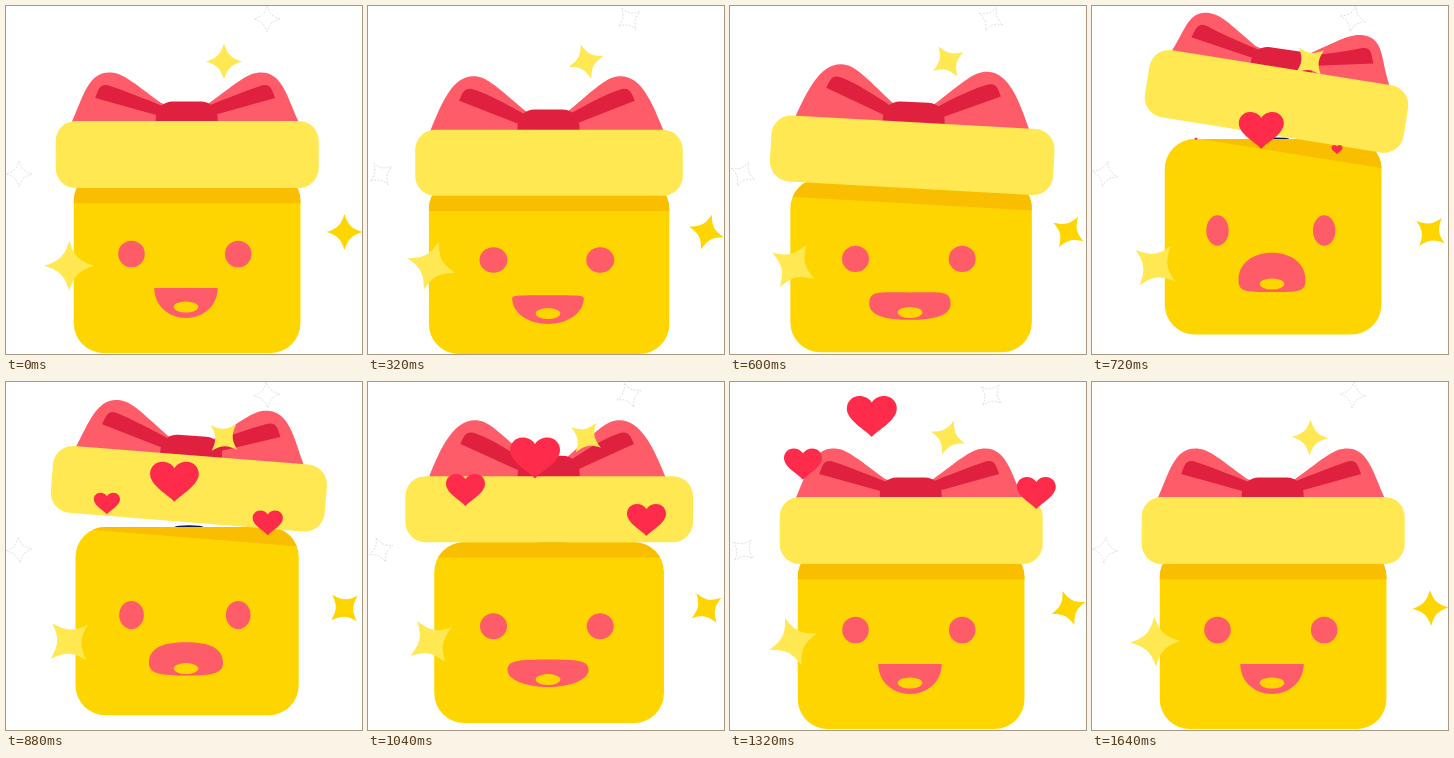
An HTML page that plays this animation: 356 px wide and 348 px high, repeating every 1.68 s.

```html
<!DOCTYPE html>
<html lang="en">
<head>
<meta charset="utf-8">
<title>Happy gift box</title>
<style>
html, body { margin: 0; width: 100%; height: 100%; overflow: hidden; background: #fff; }
svg { display: block; width: 356px; height: 348px; }
</style>
</head>
<body>
<svg id="stage" viewBox="0 0 356 348" xmlns="http://www.w3.org/2000/svg">
  <clipPath id="inside"><rect id="insideBox" rx="30"/></clipPath>
  <ellipse id="opening" cx="183" rx="14" ry="1.6" fill="#101a4a"/>
  <rect id="body" rx="30" fill="#ffd500"/>
  <g clip-path="url(#inside)"><rect id="shade" x="-220" width="440" fill="#f9be00"/></g>
  <g id="bow">
    <path id="loopL" fill="#ff5c69"/>
    <path id="loopR" fill="#ff5c69" transform="scale(-1 1)"/>
    <path id="foldL" fill="#e0203f"/>
    <path id="foldR" fill="#e0203f" transform="scale(-1 1)"/>
    <path id="knot" d="M-31 6V-2C-31-13-23-19.5-14-19.5H14C23-19.5 31-13 31-2V6Z" fill="#e0203f"/>
  </g>
  <rect id="lid" rx="20" fill="#ffe852"/>
  <ellipse id="eyeL" cx="125.5" fill="#ff5c69"/>
  <ellipse id="eyeR" cx="232.2" fill="#ff5c69"/>
  <path id="mouth" fill="#ff5c69"/>
  <ellipse id="tongue" cx="180" rx="12.3" ry="5.5" fill="#ffd500"/>
  <g id="hearts"></g>
  <g id="stars"></g>
</svg>
<script>
const LOOP = 1680, STEP = 40;
const $ = id => document.getElementById(id);

function set(el, attrs) {
  for (const k in attrs) el.setAttribute(k, attrs[k]);
}

function add(parent, attrs) {
  const el = document.createElementNS('http://www.w3.org/2000/svg', 'path');
  set(el, attrs);
  parent.appendChild(el);
  return el;
}

// Monotone cubic through (ts, vs), flat at both ends and at every extreme.
function curve(ts, vs, t) {
  const last = ts.length - 1;
  if (t <= ts[0]) return vs[0];
  if (t >= ts[last]) return vs[last];
  let i = 0;
  while (t >= ts[i + 1]) i++;
  const slope = j => (vs[j + 1] - vs[j]) / (ts[j + 1] - ts[j]);
  const tangent = j => {
    if (j === 0 || j === last) return 0;
    const a = slope(j - 1), b = slope(j);
    return a * b <= 0 ? 0 : 2 * a * b / (a + b);
  };
  const h = ts[i + 1] - ts[i], u = (t - ts[i]) / h, u2 = u * u, u3 = u2 * u;
  return vs[i] * (2 * u3 - 3 * u2 + 1) + vs[i + 1] * (3 * u2 - 2 * u3)
    + h * (tangent(i) * (u3 - 2 * u2 + u) + tangent(i + 1) * (u3 - u2));
}

// Each row: rest, crouch, squash, jump, landing.
const poses = {
  lidX: [181.2, 181, 181, 184.5, 181.2],
  lidY: [148.5, 156.8, 178.6, 95.3, 127.2],
  lidW: [263, 267.6, 295.4, 262, 287.6],
  lidH: [67, 66, 65, 68, 66],
  tilt: [0, 0, 0, 9.1, 0],
  bodyW: [226.7, 240.4, 255, 216.7, 229.7],
  top: [165, 173, 194, 133, 160.3],
  bottom: [347, 348, 356, 328.5, 341],
  bowH: [48.5, 53.5, 60, 44, 56],
  eyeY: [248, 254, 268.3, 224.5, 244.3],
  eyeW: [13.3, 14, 14.7, 11.2, 13.5],
  eyeH: [13.3, 12.7, 12, 15.3, 13],
  mouthW: [31.7, 35.8, 44.5, 33.5, 40.5],
  lipY: [282, 289.3, 308, 246.7, 277.5],
  sideY: [282, 292.5, 311, 274, 288],
  lipIn: [31, 33, 40, 19, 30],
  lipUp: [0, 3, 10, 17, 9.5],
  chinY: [312, 318, 329, 286, 305],
  chinIn: [17, 20, 25, 27, 22],
  chinUp: [18, 14, 10, 12, 10],
  tongueY: [301, 307.6, 322, 278, 297.6]
};
const poseTimes = [0, 120, 320, 520, 720, 1040, 1200];
const poseOrder = [0, 0, 1, 2, 3, 4, 0];

const hearts = [
  { t: [600, 720, 1040, 1320, 1600], x: [170, 169.3, 167, 141.8, 130], y: [145, 124.5, 76, 34.5, 2], w: [0, 45, 50, 50, 0] },
  { t: [700, 720, 1040, 1320, 1560], x: [105, 104, 97.5, 73, 58], y: [134, 133, 108, 82, 64], w: [0, 3, 39, 38, 0] },
  { t: [680, 720, 1040, 1320, 1580], x: [241, 245, 278.5, 306.3, 320], y: [145, 143.5, 138, 111, 92], w: [0, 11, 39, 39, 0] }
];
const heartPath = 'M0 20.5C-6 13.5-25 4-25-8C-25-15-19.5-20.5-12.5-20.5'
  + 'C-7-20.5-2.5-18 0-14C2.5-18 7-20.5 12.5-20.5C19.5-20.5 25-15 25-8C25 4 6 13.5 0 20.5Z';
for (const h of hearts) h.el = add($('hearts'), { d: heartPath, fill: '#ff2b4a' });

// turn: degrees per loop
const stars = [
  { x: 261, y: 13, r: 13, turn: -180 },
  { x: 13, y: 168, r: 13, turn: -180 },
  { x: 218, y: 55.5, r: 18, turn: -90, fill: '#ffe852' },
  { x: 338.5, y: 226, r: 18, turn: 90, fill: '#ffd500' },
  { x: 63.3, y: 259.7, r: 25, turn: 90, fill: '#ffe852' }
];
for (const s of stars) {
  const r = s.r, a = r * 0.2, b = r * 0.38;
  s.el = add($('stars'), {
    d: `M0 ${-r}C${a} ${-b} ${b} ${-a} ${r} 0C${b} ${a} ${a} ${b} 0 ${r}`
      + `C${-a} ${b} ${-b} ${a} ${-r} 0C${-b} ${-a} ${-a} ${-b} 0 ${-r}Z`,
    fill: s.fill || '#fff'
  });
  if (!s.fill) set(s.el, { stroke: '#d4d4d4', 'stroke-width': 0.7, 'stroke-dasharray': '2 1.5' });
}

function drawBow(p) {
  const H = p.bowH, k = (H - 48.5) / 11.5;
  const foot = -113 - 7.5 * k, px = -76 + 5.5 * k, tx = -90 + 5 * k, ty = -23 - 14 * k;
  const loop = `M${foot - 2} 6L${foot} 0C${foot + 11} ${-H * 0.5} ${px - 21} ${-H} ${px} ${-H}`
    + `C${px + 13} ${-H} ${px + 21} ${-H * 0.84} ${-24 + 8 * k} -18L0 -10V6Z`;
  const fold = `M${tx} ${ty}C${tx + 4} ${15 - H} ${px - 9} ${9 - H} ${px + 4} ${14.5 - H}`
    + `C${px + 14} ${18 - H} -42 ${-23 - 9 * k} -20 -14L-29 -6Z`;
  for (const side of 'LR') {
    set($('loop' + side), { d: loop });
    set($('fold' + side), { d: fold });
  }
  set($('knot'), { transform: `translate(1.5 0) scale(1 ${1 + 0.08 * k})` });
  const a = p.tilt * Math.PI / 180, up = p.lidH / 2;
  const x = p.lidX - 2 + up * Math.sin(a), y = p.lidY - up * Math.cos(a);
  set($('bow'), { transform: `translate(${x} ${y}) rotate(${p.tilt * 0.9})` });
}

function drawFace(p) {
  for (const id of ['eyeL', 'eyeR']) set($(id), { cy: p.eyeY, rx: p.eyeW, ry: p.eyeH });
  const half = s => [
    `C${s * p.lipIn} ${p.lipY} ${s * p.mouthW} ${p.sideY - p.lipUp} ${s * p.mouthW} ${p.sideY}`,
    `C${s * p.mouthW} ${p.sideY + p.chinUp} ${s * p.chinIn} ${p.chinY} 0 ${p.chinY}`
  ].join('');
  const start = `M0 ${p.lipY}`;
  set($('mouth'), { d: start + half(1) + start + half(-1), transform: 'translate(180 0)' });
  set($('tongue'), { cy: p.tongueY });
}

function render(t) {
  const p = {};
  for (const k in poses) p[k] = curve(poseTimes, poseOrder.map(i => poses[k][i]), t);

  const box = { x: 181.1 - p.bodyW / 2, y: p.top, width: p.bodyW, height: p.bottom - p.top };
  set($('body'), box);
  set($('insideBox'), box);
  set($('opening'), { cy: p.top });

  const place = `translate(${p.lidX} ${p.lidY}) rotate(${p.tilt})`;
  set($('lid'), { x: -p.lidW / 2, y: -p.lidH / 2, width: p.lidW, height: p.lidH, transform: place });
  set($('shade'), { y: -60, height: 60 + p.lidH / 2 + 15.3, transform: place });
  drawBow(p);
  drawFace(p);

  for (const h of hearts) {
    const [x, y, w] = [h.x, h.y, h.w].map(v => curve(h.t, v, t));
    set(h.el, { transform: `translate(${x} ${y}) scale(${w / 50})`, visibility: w > 0.2 ? 'visible' : 'hidden' });
  }
  for (const s of stars) {
    set(s.el, { transform: `translate(${s.x} ${s.y}) rotate(${s.turn * t / LOOP})` });
  }
}

function tick(now) {
  render(Math.floor((now % LOOP + 0.01) / STEP) * STEP);
  requestAnimationFrame(tick);
}
render(0);
requestAnimationFrame(tick);
</script>
</body>
</html>
```
